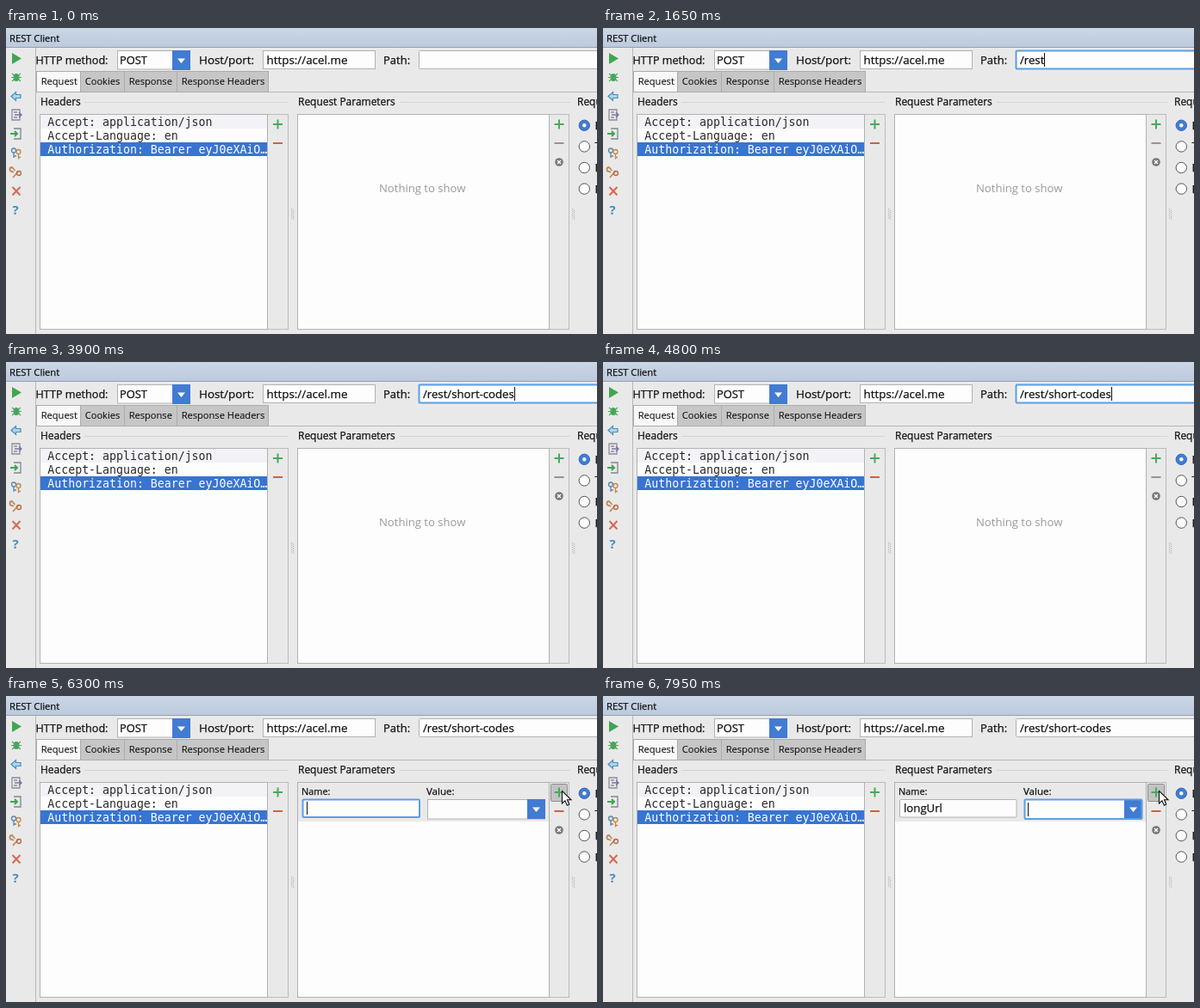
Recreate the animation shown at these times as an HTML page. Size 686x356 px, loop 8 s.

```html
<!DOCTYPE html>
<html lang="en">
<head>
<meta charset="utf-8">
<title>REST Client</title>
<style>
html, body { margin: 0; width: 100%; height: 100%; overflow: hidden; background: #eae9ea; }
svg { display: block; }
text { font-family: "Open Sans", "Noto Sans", sans-serif; font-size: 13.2px; fill: #111; stroke: #111; stroke-width: .25; white-space: pre; }
.mono text { font-family: "DejaVu Sans Mono", monospace; font-size: 13.24px; fill: #2a2a2a; stroke: none; }
.tab text { font-size: 11.1px; stroke-width: .1; }
.group { font-size: 11.95px; }
.box { fill: #fdfdfd; stroke: #b2b2b2; }
.panel { fill: #eae9ea; stroke: #bcbcbc; }
.focus { stroke: #5a9fe6; stroke-width: 2; }
.line { fill: none; stroke: #b8b8b8; }
.icon { fill: none; stroke-width: 2; }
.green { stroke: #4aa95c; }
.red { stroke: #c9653f; }
.blue { stroke: #3a87b8; }
.gray { stroke: #939393; }
.caret { stroke: #111; }
</style>
</head>
<body>
<svg width="686" height="356" viewBox="0 0 686 356">
  <defs>
    <linearGradient id="bar" x2="0" y2="1">
      <stop stop-color="#cbd6e5"/><stop offset="1" stop-color="#bdcade"/>
    </linearGradient>
    <path id="plus" d="M-5.5 0H5.5M0-5.5V5.5"/>
    <path id="minus" d="M-5.5 0H5.5"/>
    <g id="drop">
      <rect width="21" height="23" fill="#427bd2"/>
      <path d="M6 9.500h9l-4.500 5.500z" fill="#fff"/>
    </g>
    <g id="grip" fill="#b3b3b3"></g>
  </defs>

  <rect width="686" height="22" fill="url(#bar)"/>
  <path d="M0 22.500H686" stroke="#98a0ab"/>
  <text x="4" y="15.700" style="font-size:11.2px">REST Client</text>
  <path class="line" d="M34.500 23V356"/>

  <!-- side toolbar -->
  <path d="M7 29L18 35.500L7 42z" fill="#3fa650"/>
  <g class="icon green">
    <ellipse cx="12" cy="57.500" rx="2.500" ry="3.500" fill="#3f9a50"/>
    <path d="M7 53l10 9M17 53L7 62M6 57.500H18" style="stroke-width:1.100"/>
  </g>
  <path d="M6 79.500l5.500-5v3H17v4h-5.500v3z" fill="#a9d5ee" stroke="#4a90bd" stroke-width="1.200"/>
  <g class="icon" style="stroke-width:1.300">
    <path d="M7 95h9v12H7z" stroke="#8a8e9c"/>
    <path d="M9 98h4M9 104h4" stroke="#8a8e9c"/>
    <path d="M10 101h8m-3-3l3 3-3 3" stroke="#7d70a8"/>
    <path d="M9 117h8v12H9" stroke="#7c8890"/>
    <path d="M5 123h8m-3-3l3 3-3 3" stroke="#3fa650" stroke-width="2"/>
    <circle cx="9" cy="142.500" r="2.500" stroke="#5b86b0"/>
    <path d="M9 145v6m0-2h3" stroke="#5b86b0"/>
    <circle cx="14.500" cy="144" r="2.500" stroke="#c18a44"/>
    <path d="M14.500 146.500v6m0-2h2.500" stroke="#c18a44"/>
    <path d="M10.500 166l-3.500-4a2.500 2.500 0 0 0 0 5l2 1M14 167l-6 7" stroke="#c08a58" style="stroke-width:1.800"/>
    <circle cx="15" cy="169" r="2.500" stroke="#b8693d"/>
  </g>
  <path class="icon" stroke="#d46a50" d="M7.500 185l9 9.500M16.500 185l-9 9.500"/>
  <text x="7.500" y="217" style="font-size:15px;font-weight:700;fill:#3f8fc4;stroke:none">?</text>

  <!-- address row -->
  <text x="34.500" y="41.500" style="font-size:12.6px">HTTP method:</text>
  <rect class="box" x="129.500" y="26.500" width="84" height="21.500"/>
  <use href="#drop" x="193" y="26"/>
  <text x="132" y="41.500" style="font-size:12.9px">POST</text>
  <text x="224" y="41.500" style="font-size:13.4px">Host/port:</text>
  <rect class="box" x="298.500" y="26.500" width="130" height="21"/>
  <text x="302.500" y="41.500" style="font-size:13.4px">https://acel.me</text>
  <text x="438" y="41.500" style="font-size:13px">Path:</text>
  <rect id="pathBox" class="box" x="479.500" y="26.500" width="230" height="21" rx="1"/>
  <text id="path" x="484" y="41.500"></text>
  <path id="pathCaret" class="caret" d="M.5 29V45"/>

  <!-- tabs -->
  <path class="line" d="M35 74.500H686"/>
  <g id="tabs" class="tab"></g>

  <!-- headers -->
  <text class="group" x="40" y="89.500">Headers</text>
  <path d="M91 86.500H327M457 86.500H655" stroke="#d6d6d6"/>
  <rect class="panel" x="39.500" y="100.500" width="288" height="250"/>
  <rect class="box" x="39.500" y="100.500" width="264" height="250"/>
  <rect x="40" y="101" width="263" height="16" fill="#f2f2f7"/>
  <rect x="40" y="133" width="263" height="16" fill="#3874d1"/>
  <g class="mono">
    <text x="48.300" y="114">Accept: application/json</text>
    <text x="48.300" y="130">Accept-Language: en</text>
    <text x="48.300" y="145.500" style="fill:#fff">Authorization: Bearer eyJ0eXAiO…</text>
  </g>
  <use class="icon green" href="#plus" x="315.500" y="112"/>
  <use class="icon red" href="#minus" x="315.500" y="134"/>
  <use href="#grip" x="331" y="210"/>

  <!-- parameters -->
  <text class="group" x="339" y="89.500">Request Parameters</text>
  <rect class="panel" x="338.500" y="100.500" width="315" height="250"/>
  <rect class="box" x="338.500" y="100.500" width="292" height="250"/>
  <text id="empty" x="433" y="191" style="font-size:13.1px;fill:#999;stroke:none">Nothing to show</text>
  <g id="table">
    <rect x="339" y="101" width="291" height="22" fill="#eae9ea"/>
    <text x="343" y="115" style="font-size:10.9px">Name:</text>
    <text x="488" y="115" style="font-size:11.5px">Value:</text>
    <rect x="632.500" y="102.500" width="19" height="20" rx="1" fill="#c3c3c3" stroke="#8d8d8d"/>
  </g>
  <g id="row">
    <rect x="339" y="123" width="291" height="23" fill="#eae9ea"/>
    <rect id="nameBox" class="box" x="344.500" y="120.500" width="135.500" height="20.500" rx="1"/>
    <text id="name" x="349" y="135"></text>
    <path id="nameCaret" class="caret" d="M.5 123V138"/>
    <rect class="box" x="489.500" y="120.500" width="136" height="22.500"/>
    <use href="#drop" x="605" y="120"/>
    <rect id="valueBox" x="489.500" y="120.500" width="136" height="22.500" rx="1" fill="none"/>
    <path id="valueCaret" class="caret" d="M493.500 124V140"/>
  </g>
  <use class="icon green" href="#plus" x="642" y="112"/>
  <use id="remove" class="icon gray" href="#minus" x="642" y="134"/>
  <circle cx="642" cy="156" r="4.800" fill="#777"/>
  <path d="M640 154l4 4m0-4l-4 4" stroke="#fff" stroke-width="1.300"/>
  <use href="#grip" x="657" y="210"/>

  <!-- body options -->
  <text class="group" x="663" y="89.500">Request Body</text>
  <g id="radios"></g>

  <path id="pointer" d="M0 0V14.500L3.400 11.300L5.900 16.700L8.300 15.600L5.900 10.300H10.500z" fill="#fff" stroke="#111" stroke-width="1.100"/>
</svg>
<script>
const $ = id => document.getElementById(id);
const clamp = (v, lo, hi) => Math.max(lo, Math.min(hi, v));
const show = (id, on) => $(id).style.display = on ? '' : 'none';
const STEP = 150, LOOP = 8000;
const PATH = '/rest/short-codes', NAME = 'longUrl';

$('tabs').innerHTML = [['Request', 35, 51], ['Cookies', 86, 51], ['Response', 137, 61], ['Response Headers', 198, 106]]
  .map(([label, x, w], i) => `<rect x="${x + .5}" y="50.500" width="${w}" height="24"
    fill="${i ? '#c6c6c6' : '#f8f8f8'}" stroke="#acacac"/><text x="${x + 5.7}" y="66">${label}</text>`).join('');

$('radios').innerHTML = ['Empty', 'Text', 'File contents', 'File upload'].map((label, i) => {
  const y = 113.3 + i * 24.6;
  return `<circle cx="671.300" cy="${y}" r="6.200" fill="${i ? '#fdfdfd' : '#427bd2'}" stroke="${i ? '#555' : '#3568b8'}"/>
    ${i ? '' : `<circle cx="671.300" cy="${y}" r="2.200" fill="#fff"/>`}
    <text x="683.500" y="${y + 4.5}">${label}</text>`;
}).join('');

for (let i = 0; i < 10; i++)
  $('grip').innerHTML += `<rect x="${i % 2 * 2}" y="${i * 1.3}" width="1.200" height="1.200"/>`;

function type(id, text, focused) {
  const field = $(id), caret = $(id + 'Caret');
  field.textContent = text;
  $(id + 'Box').setAttribute('class', focused ? 'box focus' : 'box');
  show(id + 'Caret', focused);
  const width = text ? field.getComputedTextLength() : 0;
  caret.setAttribute('transform', `translate(${Math.round(+field.getAttribute('x') + width)})`);
}

function pointer(k) {
  const glide = (from, to, a, b) => {
    const p = clamp((k - a) / (b - a), 0, 1), e = p * p * (3 - 2 * p);
    return from.map((v, i) => v + (to[i] - v) * e);
  };
  const [x, y] = k < 20 ? glide([676, 130], [560, 34], 1, 5) : glide([680, 62], [645.5, 110.5], 33, 35);
  show('pointer', k >= 1 && k < 7 || k >= 33);
  $('pointer').setAttribute('transform', `translate(${x} ${y})`);
}

function draw(now) {
  const k = Math.floor(now % LOOP / STEP);
  const table = k >= 36, row = k >= 38, value = k >= 50;
  const typed = k < 15 ? clamp(k - 6, 0, 6) : k - 8;
  type('path', PATH.slice(0, typed), k >= 5 && !table);
  type('name', NAME.slice(0, clamp(k - 42, 0, 7)), row && !value);
  show('empty', !table);
  show('table', table);
  show('row', row);
  $('remove').setAttribute('class', row ? 'icon red' : 'icon gray');
  $('valueBox').setAttribute('class', value ? 'focus' : '');
  show('valueCaret', value);
  pointer(k);
}

const start = performance.now();
(function loop() {
  draw(performance.now() - start);
  requestAnimationFrame(loop);
})();
</script>
</body>
</html>
```
